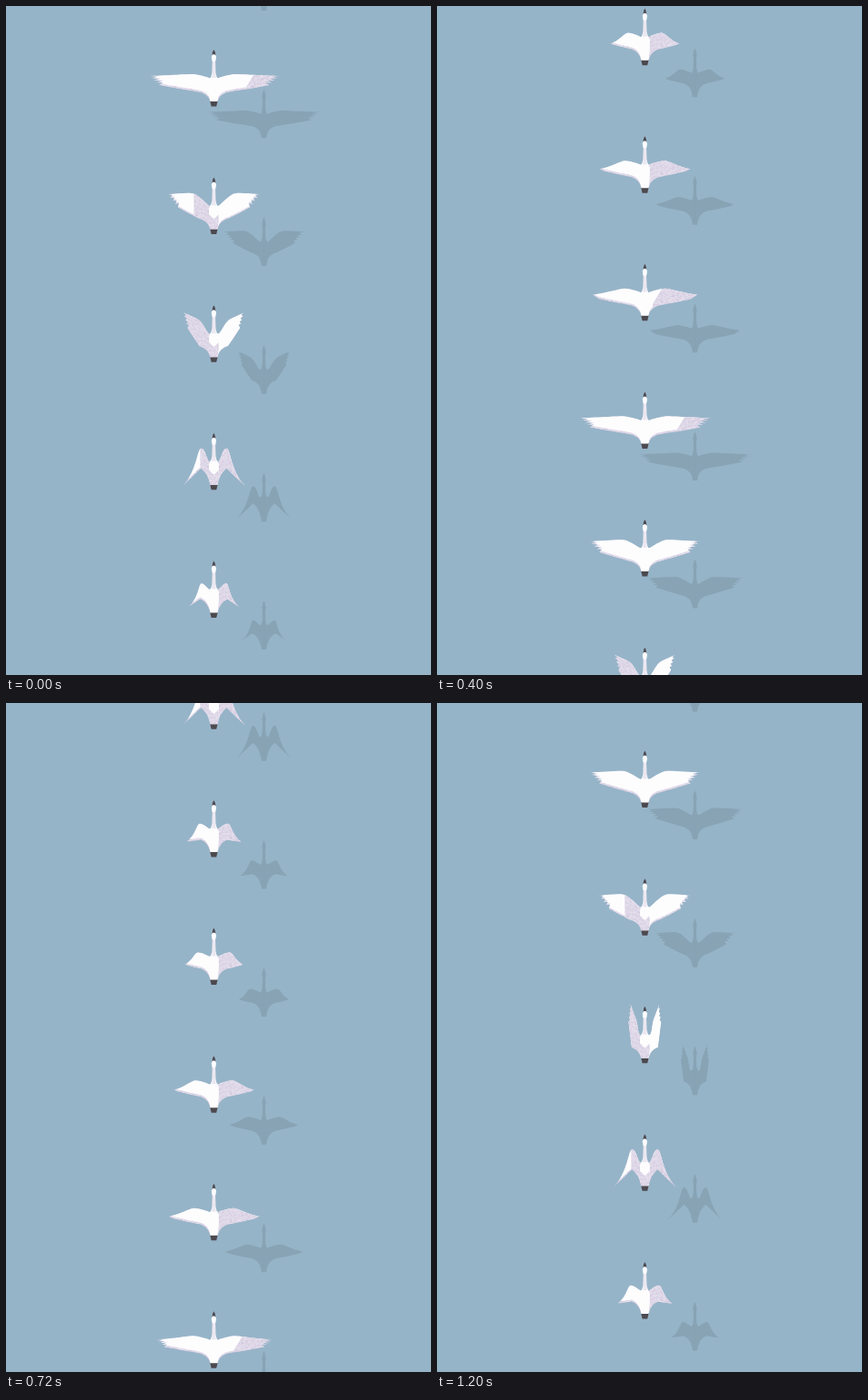
An HTML page with a canvas for the animation above (1240 ms loop, 467 by 736 pixels).

```html
<!DOCTYPE html>
<html lang="en">
<head>
<meta charset="utf-8">
<title>Swans in flight</title>
<style>
  html, body { margin: 0; width: 100%; height: 100%; overflow: hidden; background: #96b4c8; }
  canvas { display: block; }
</style>
</head>
<body>
<canvas id="stage" width="467" height="736"></canvas>
<script>
const ctx = document.getElementById('stage').getContext('2d');
const SKY = '#96b4c8', SHADOW = '#87a3b4', WHITE = '#fdfdfe', DARK = '#4c494f';
const FRAME_MS = 40, FRAMES = 31, SPACING = 140.6, CENTER = 228.4;
const STEPS = 14;

// Key positions of one wing; the steps between them are blended.
// Lavender covers the left wing out to `left` and the right wing from `right`.
const keys = [
  { step: 0, wrist: [9, 16], tip: [16, -3], last: [18, 17], trail: [14.5, 45], left: 99, right: 99 },
  { step: 2, wrist: [22, 18], tip: [51.5, 18.5], last: [40, 33], trail: [17, 45], left: 22, right: 99 },
  { step: 4, wrist: [22, 27], tip: [73, 29], last: [61, 39], trail: [18, 46.5], left: -22, right: 38 },
  { step: 7, wrist: [22, 27], tip: [50, 36], last: [45, 38.5], trail: [15, 45], left: 0, right: 0 },
  { step: 10, wrist: [18, 27], tip: [32, 40], last: [30, 41], trail: [14, 45], left: 0, right: 0 },
  { step: 12, wrist: [14, 25], tip: [28.5, 51], last: [27, 50], trail: [15, 42], left: 0, right: 0 },
  { step: 13, wrist: [14, 17], tip: [34.5, 58], last: [33, 57], trail: [14, 39], left: 15, right: 0 }
];

const mix = (a, b, k) => Array.isArray(a) ? a.map((v, i) => mix(v, b[i], k)) : a + (b - a) * k;
const clamp = (v, low, high) => Math.min(high, Math.max(low, v));

function poseAt(step) {
  const next = Math.max(1, keys.findIndex(key => key.step >= step));
  const from = keys[next - 1], to = keys[next], pose = {};
  const k = (step - from.step) / (to.step - from.step);
  for (const name in from) pose[name] = mix(from[name], to[name], k);
  pose.path = wingPath(pose);
  return pose;
}

function wingPath({ wrist, tip, last, trail }) {
  const path = new Path2D();
  const [wx, wy] = wrist, [tx, ty] = tip, [rx, ry] = trail;
  const sx = 5.5, sy = 31;
  const toWrist = Math.hypot(wx - sx, wy - sy), toTip = Math.hypot(tx - wx, ty - wy);
  const ux = (tx - wx) / toTip, uy = (ty - wy) / toTip;
  let dx = (wx - sx) / toWrist + ux, dy = (wy - sy) / toWrist + uy;
  const reach = Math.min(toWrist, toTip) * 0.28 / Math.hypot(dx, dy);
  dx *= reach;
  dy *= reach;
  path.moveTo(0, 30);
  path.lineTo(2, 29.5);
  path.quadraticCurveTo(4, 32, sx, sy);
  path.bezierCurveTo(sx + 2, sy - 1, wx - dx, wy - dy, wx, wy);

  // The further back the wing is swept, the more its leading edge caves in.
  const sag = Math.max(0, ty - 28) * 0.25;
  const [mx, my] = mix(wrist, tip, 0.55);
  path.bezierCurveTo(wx + dx, wy + dy, mx - uy * sag, my + ux * sag, tx, ty);

  const feathers = ty < 33 ? 5 : 1;
  for (let i = 1; i < feathers; i++) {
    const gap = mix(tip, last, (i - 0.5) / (feathers - 1));
    path.lineTo(...mix(gap, wrist, 0.17));
    path.lineTo(...mix(tip, last, i / (feathers - 1)));
  }
  path.lineTo(...last);
  path.quadraticCurveTo((last[0] + rx) / 2, (last[1] + ry) / 2 + 0.5, rx, ry);
  path.quadraticCurveTo(6.5, (ry + 50) / 2, 4, 57);
  path.lineTo(0, 57);
  path.closePath();
  return path;
}
const poses = Array.from({ length: STEPS }, (_, step) => poseAt(step));

const beak = new Path2D('M0 0Q1.6 2 1.8 6H-1.8Q-1.6 2 0 0Z');
const head = new Path2D('M0 5Q2 5 2.6 8Q2.4 11 1.6 13H-1.6Q-2.4 11-2.6 8Q-2 5 0 5Z');
const neck = new Path2D('M-1.6 11H1.6L2.3 31H-2.3Z');
const body = new Path2D('M-2 26H2Q3 31 5.5 34Q6 46 4 57H-4Q-6 46-5.5 34Q-3 31-2 26Z');
const rump = new Path2D('M-6 40L0 46L5 41Q6 48 4 57H-4Q-6 49-6 40Z');
const tail = new Path2D('M-4.2 56.5H4.2L2.8 62.5H-2.8Z');

// Speckled lavender plumage.
function makeGrain() {
  const size = 64, tile = document.createElement('canvas');
  tile.width = tile.height = size;
  const g = tile.getContext('2d');
  g.fillStyle = '#dfd8e8';
  g.fillRect(0, 0, size, size);
  let seed = 7;
  const random = () => (seed = seed * 16807 % 2147483647) / 2147483647;
  for (let i = 0; i < 1300; i++) {
    g.fillStyle = i % 2 ? '#cfc5dc' : '#ebe6f1';
    g.fillRect(Math.floor(random() * size), Math.floor(random() * size), 1, 1);
  }
  return ctx.createPattern(tile, 'repeat');
}
const grain = makeGrain();

function fill(path, color) {
  ctx.fillStyle = color;
  ctx.fill(path);
}

function shade(from, to) {
  const slant = Math.min(8, from);
  ctx.fillStyle = grain;
  ctx.beginPath();
  ctx.moveTo(from + slant, -8);
  ctx.lineTo(from + slant, 24);
  ctx.lineTo(from - slant / 2, 44);
  ctx.lineTo(from - slant / 2, 62);
  ctx.lineTo(to, 62);
  ctx.lineTo(to, -8);
  ctx.fill();
}

function drawWing(pose, side) {
  ctx.save();
  ctx.scale(side, 1);
  ctx.clip(pose.path);
  fill(pose.path, grain);
  const rim = clamp(pose.tip[1] * 0.1, 0, 2.2);
  ctx.translate(0, -rim);
  fill(pose.path, WHITE);
  ctx.translate(0, rim);
  if (side < 0) shade(0, Math.max(0, pose.left));
  else shade(pose.right, 99);
  ctx.restore();
}

function drawBird(pose, y) {
  ctx.save();
  ctx.translate(CENTER, y);
  drawWing(pose, -1);
  drawWing(pose, 1);
  fill(tail, DARK);
  fill(body, WHITE);
  if (pose.left > 10) fill(rump, grain);
  fill(neck, '#ece8f1');
  fill(beak, DARK);
  fill(head, WHITE);
  ctx.restore();
}

function drawShadow(pose, y) {
  ctx.save();
  ctx.translate(CENTER + 55, y + 44);
  ctx.scale(0.856, 0.856);
  for (const part of [beak, head, neck, body, tail, pose.path]) fill(part, SHADOW);
  ctx.scale(-1, 1);
  fill(pose.path, SHADOW);
  ctx.restore();
}

function draw(now) {
  const frame = Math.floor(now / FRAME_MS) % FRAMES;
  ctx.fillStyle = SKY;
  ctx.fillRect(0, 0, 467, 736);
  const flock = [];
  for (let i = -1; i < 6; i++) {
    // Each bird is one loop ahead of the one below; every pose is held for two frames.
    const age = frame + FRAMES * (5 - i) + 21;
    flock.push([poses[Math.floor(age / 2) % STEPS], 48 + SPACING * (i - frame / FRAMES)]);
  }
  for (const bird of flock) drawShadow(...bird);
  for (const bird of flock) drawBird(...bird);
}

const start = performance.now();
function tick() {
  draw(performance.now() - start);
  requestAnimationFrame(tick);
}
tick();
</script>
</body>
</html>
```
